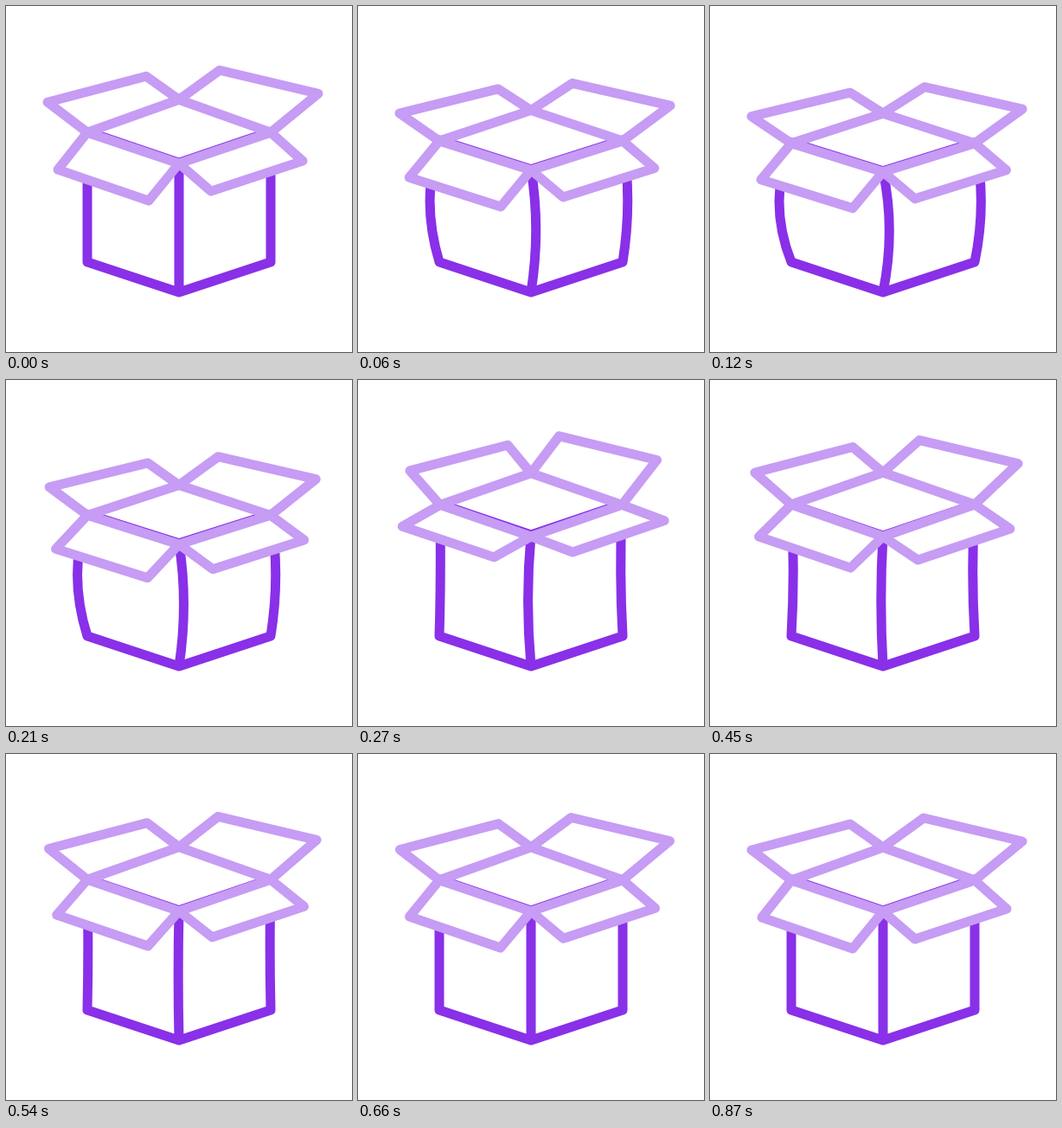
Animation, 400 px wide and 400 px high, one loop 900 ms. Source, as an HTML page without scripts:

```html
<!DOCTYPE html>
<html lang="en">
<head>
<meta charset="utf-8">
<title>Open box</title>
<style>
  html, body { margin: 0; width: 100%; height: 100%; overflow: hidden; background: #fff; }
  svg { display: block; width: 100%; height: 100%; }
  path { fill: none; stroke-width: 11; stroke-linecap: round; stroke-linejoin: round; }
  .body { stroke: #8930e8; }
  .lid { stroke: #c69cf4; }
  .front { fill: #fff; }
</style>
</head>
<body>
<!-- Poses of every part: rest, squash, pop, settling, rest -->
<svg viewBox="0 0 400 400">
  <path class="body" d="M94 145L200 181L306 145C306 195 306 245 306 296L200 331L94 296C94 245 94 195 94 145ZM200 181C200 230 200 280 200 331">
    <animate attributeName="d" dur="900ms" repeatCount="indefinite" calcMode="spline"
      keyTimes="0;.1667;.3667;.5;1" keySplines=".2 .4 .3 1;.65 0 .35 1;.4 0 .7 .75;.1 .6 .3 1"
      values="M94 145L200 181L306 145C306 195 306 245 306 296L200 331L94 296C94 245 94 195 94 145ZM200 181C200 230 200 280 200 331;
              M94 158L200 191L306 158C316 203 316 249 306 296L200 331L94 296C75 249 75 203 94 158ZM200 191C210 237 210 283 200 331;
              M95 141L200 177L305 141C301 192 301 244 306 296L200 331L94 296C99 244 99 192 95 141ZM200 177C193 228 193 279 200 331;
              M94 144L200 180L306 144C303 194 303 245 306 296L200 331L94 296C97 245 97 194 94 144ZM200 180C197 230 197 280 200 331;
              M94 145L200 181L306 145C306 195 306 245 306 296L200 331L94 296C94 245 94 195 94 145ZM200 181C200 230 200 280 200 331"/>
  </path>
  <path class="lid" d="M94 146L48 111L162 81L200 108L247 74L361 101L306 146M94 146L200 108L306 146">
    <animate attributeName="d" dur="900ms" repeatCount="indefinite" calcMode="spline"
      keyTimes="0;.1667;.3667;.5;1" keySplines=".2 .4 .3 1;.65 0 .35 1;.4 0 .7 .75;.1 .6 .3 1"
      values="M94 146L48 111L162 81L200 108L247 74L361 101L306 146M94 146L200 108L306 146;
              M94 159L48 128L162 100.5L200 124.5L248 94L361 119.5L306 159M94 159L200 124.5L306 159;
              M95 142L62 101L175 71L200 105L230 60L343 88L305 142M95 142L200 105L305 142;
              M94 144L52 107L165 77.5L200 107L242 69.5L356 96.5L306 144M94 144L200 107L306 144;
              M94 146L48 111L162 81L200 108L247 74L361 101L306 146M94 146L200 108L306 146"/>
  </path>
  <path class="lid front" d="M94 146L60 189L165 225L200 182ZM200 182L237 214L343 179L306 146Z">
    <animate attributeName="d" dur="900ms" repeatCount="indefinite" calcMode="spline"
      keyTimes="0;.1667;.3667;.5;1" keySplines=".2 .4 .3 1;.65 0 .35 1;.4 0 .7 .75;.1 .6 .3 1"
      values="M94 146L60 189L165 225L200 182ZM200 182L237 214L343 179L306 146Z;
              M94 159L59 201L165 234L200 192ZM200 192L237 223L342.5 190L306 159Z;
              M95 142L50 164L156 200L200 179ZM200 179L250 195L356 158L305 142Z;
              M94 144L56.5 181L162.5 217L200 181ZM200 181L240.5 208L347 172L306 144Z;
              M94 146L60 189L165 225L200 182ZM200 182L237 214L343 179L306 146Z"/>
  </path>
</svg>
</body>
</html>
```
